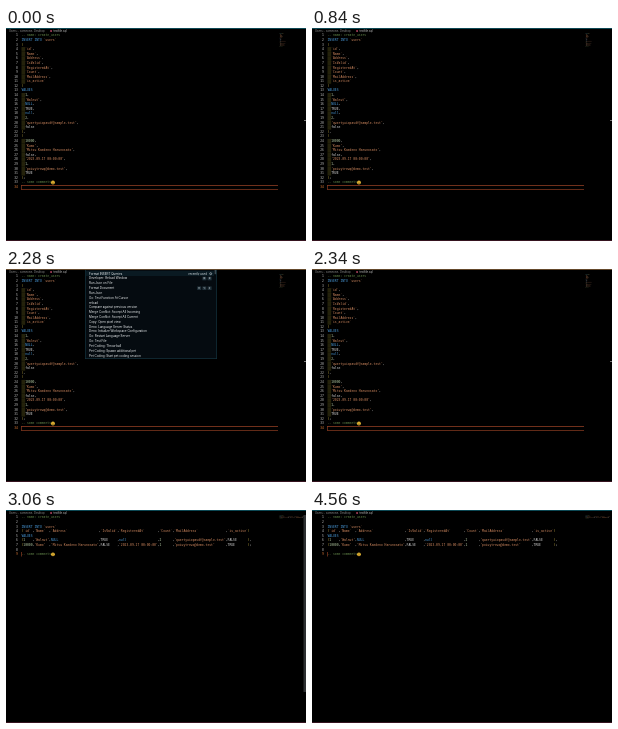
An HTML page with a canvas that plays this animation: 300 px wide and 213 px high, repeating every 4620 ms.

```html
<!DOCTYPE html>
<html lang="en">
<head>
<meta charset="utf-8">
<title>Formatting INSERT queries</title>
<style>
html, body { margin: 0; width: 100%; height: 100%; overflow: hidden; background: #000; }
canvas { display: block; width: 300px; height: 213px; }
</style>
</head>
<body>
<canvas id="stage" width="300" height="213"></canvas>
<script>
const ctx = document.getElementById('stage').getContext('2d');
const LOOP = 4620, OPEN = 1080, CLOSE = 2340, FORMAT = 2400;
const WARM_START = 1800, WARM_END = 2280;
const FADE_START = 2820, FADE_END = 3720;
const LEFT = 15.5, TOP = 7.6, ROW = 4.59, COL = 1.84;
const MONO = '"DejaVu Sans Mono", monospace';
const SANS = 'Inter, sans-serif';
const color = {
  comment: '#668a4c', keyword: '#4a9bdb', string: '#d38a60',
  number: '#b9d0a8', plain: '#d6d6d6', bracket: '#d7bd4a',
  teal: '#126879', accent: '#8c3d22', indent: '#24220b'
};

const address = "'Mitsu Kaedeno Harunosato'";
const mailA = "'qwertyuiopasdf@sample.test'";
const mailB = "'poiuytrewq@demo.test'";
const date = "'2023-09-17 00:00:00'";
const fields = ['id', 'Name', 'Address', 'IsValid', 'RegisteredAt', 'Count', 'MailAddress', 'is_active']
  .map(name => '`' + name + '`');
const first = ['1', "'Walnut'", 'NULL', 'TRUE', 'null', '2', mailA, 'false'];
const second = ['10000', "'Kumo'", address, 'false', date, '1', mailB, 'TRUE'];

const listed = cells => cells.map((cell, i) => '  ' + cell + (i < cells.length - 1 ? ',' : ''));
const rawLines = [
  '-- name: create_users', 'INSERT INTO `users`', '(', ...listed(fields), ')',
  'VALUES', ...listed(first), '),', '(', ...listed(second), ');', '-- some comments', ''
];

const upper = cells => cells.map(c => /^(true|false)$/i.test(c) ? c.toUpperCase() : c);
const table = [fields, upper(first), upper(second)];
const widths = fields.map((_, i) => Math.max(...table.map(row => row[i].length)));
const aligned = table.map(row => '(' + row.map((c, i) => c.padEnd(widths[i])).join(',') + ')');
const tidyLines = [
  '-- name: create_users', '', 'INSERT INTO `users`', aligned[0], 'VALUES',
  aligned[1] + ',', aligned[2] + ';', '', '-- some comments'
];

const commands = [
  'Format INSERT Queries', 'Developer: Reload Window', 'Run Json on File', 'Format Document',
  'Run Json', 'Go: Test Function At Cursor', 'reload', 'Compare against previous version',
  'Merge Conflict: Accept All Incoming', 'Merge Conflict: Accept All Current',
  'Copy: Open pixel view', 'Deno: Language Server Status',
  'Deno: Initialize Workspace Configuration', 'Go: Restart Language Server', 'Go: Test File',
  'Pet Coding: Throw ball', 'Pet Coding: Spawn additional pet', 'Pet Coding: Start pet coding session'
];

const progress = (time, from, to) => Math.min(1, Math.max(0, (time - from) / (to - from)));

function rect(x, y, w, h, fill) {
  ctx.fillStyle = fill;
  ctx.fillRect(x, y, w, h);
}

// Tiny type is set large and scaled down to keep fractional spacing.
function text(str, x, y, size, fill, family = SANS, align = 'left') {
  ctx.save();
  ctx.translate(x, y);
  ctx.scale(size / 40, size / 40);
  ctx.font = '40px ' + family;
  ctx.textAlign = align;
  ctx.textBaseline = 'middle';
  ctx.fillStyle = fill;
  ctx.fillText(str, 0, 0);
  ctx.restore();
}

function tokenColor(token) {
  if (token.startsWith('--')) return color.comment;
  if (/^['`]/.test(token)) return color.string;
  if (/^(INSERT|INTO|VALUES|NULL)$/i.test(token)) return color.keyword;
  if (/^\d/.test(token)) return color.number;
  if (/^[()]/.test(token)) return color.bracket;
  return color.plain;
}

function tokens(line) {
  return [...line.matchAll(/--.*|'[^']*'|`[^`]*`|\w+|[(),;]/g)];
}

function drawSmiley(x, y) {
  ctx.fillStyle = '#edbd35';
  ctx.beginPath();
  ctx.arc(x, y, 1.9, 0, Math.PI * 2);
  ctx.fill();
  rect(x - 0.9, y - 0.7, 0.5, 0.6, '#55380d');
  rect(x + 0.4, y - 0.7, 0.5, 0.6, '#55380d');
  rect(x - 0.8, y + 0.5, 1.6, 0.6, '#6c4310');
}

function drawCode(lines, current) {
  lines.forEach((line, i) => {
    const y = TOP + i * ROW;
    if (line.startsWith('  ')) rect(LEFT, y - ROW / 2, COL * 2, ROW, color.indent);
    text(String(i + 1), 11.8, y, 3.05, i === current ? '#df7a35' : '#c4c4c4', MONO, 'right');
    for (const match of tokens(line)) {
      text(match[0], LEFT + match.index * COL, y, 3.06, tokenColor(match[0]), MONO);
    }
    if (line.startsWith('-- some')) drawSmiley(LEFT + 17.1 * COL, y);
  });
}

function drawMinimap(lines) {
  ctx.globalAlpha = 0.45;
  lines.forEach((line, i) => {
    for (const match of tokens(line)) {
      const x = match.index * 0.2;
      if (x < 24) rect(273.5 + x, 5 + i * 0.42, match[0].length * 0.2, 0.3, tokenColor(match[0]));
    }
  });
  ctx.globalAlpha = 1;
}

function drawBreadcrumb() {
  ['Users', 'someone', 'Desktop', 'testfile.sql'].forEach((part, i) => {
    const x = [3, 14, 28, 47.5][i];
    text(part, x, 3, 2.75, i === 3 ? '#c6c6c6' : '#929292');
    if (i) text('›', x - 2.5, 2.9, 2.8, '#777');
  });
  rect(44.3, 2.1, 1.5, 1.8, '#b64462');
}

function drawWindowEdge(time) {
  rect(0, 0, 300, 0.7, color.teal);
  if (time < FORMAT) {
    ctx.globalAlpha = progress(time, WARM_START, WARM_END);
    rect(0, 0, 300, 0.7, '#8a4a1c');
    ctx.globalAlpha = 1;
  }
  rect(0, 212, 300, 1, '#35131f');
}

function drawCurrentLine() {
  rect(15, 157, 257, 0.8, color.accent);
  rect(15, 161, 257, 0.7, color.accent);
  rect(15, 157, 0.7, 4.5, color.accent);
}

function drawKeys(keys, y) {
  keys.forEach((key, i) => {
    const x = 203.6 - (keys.length - 1 - i) * 5.2;
    rect(x - 2, y - 1.8, 4, 3.6, '#203039');
    text(key, x, y, 2.6, '#e2e7e9', SANS, 'center');
  });
}

function drawPalette() {
  rect(79, 0, 132, 90, '#153844');
  rect(79.6, 0, 130.8, 89.4, '#050b10');
  rect(80, 2, 128, 5, '#0a1a22');
  rect(208.6, 0.7, 1.6, 4.5, '#3b4a52');
  commands.forEach((name, i) => text(name, 83, 4.7 + i * 4.82, 3, '#eef1f3'));
  text('recently used', 201, 4.7, 2.9, '#e0e8eb', SANS, 'right');
  ctx.strokeStyle = '#c5d0d5';
  ctx.lineWidth = 0.6;
  ctx.beginPath();
  ctx.arc(204.7, 4.7, 1, 0, Math.PI * 2);
  ctx.stroke();
  drawKeys(['⌘', 'R'], 9.5);
  drawKeys(['⇧', '⌥', 'F'], 19.2);
}

function draw(now) {
  const time = now % LOOP;
  const formatted = time >= FORMAT;
  const lines = formatted ? tidyLines : rawLines;
  rect(0, 0, 300, 213, '#000');
  drawBreadcrumb();
  drawCode(lines, formatted ? 8 : 33);
  drawMinimap(lines);
  if (formatted) {
    const opacity = 0.6 * (1 - progress(time, FADE_START, FADE_END));
    rect(297.5, 5, 2.5, 177, `rgba(105, 110, 115, ${opacity})`);
    rect(15, 42, 0.7, 4.5, color.accent);
  } else {
    drawCurrentLine();
    rect(298, 92, 2, 1, '#777');
  }
  if (time >= OPEN && time < CLOSE) drawPalette();
  drawWindowEdge(time);
}

const start = performance.now();
function tick() {
  draw(performance.now() - start);
  requestAnimationFrame(tick);
}
tick();
</script>
</body>
</html>
```
